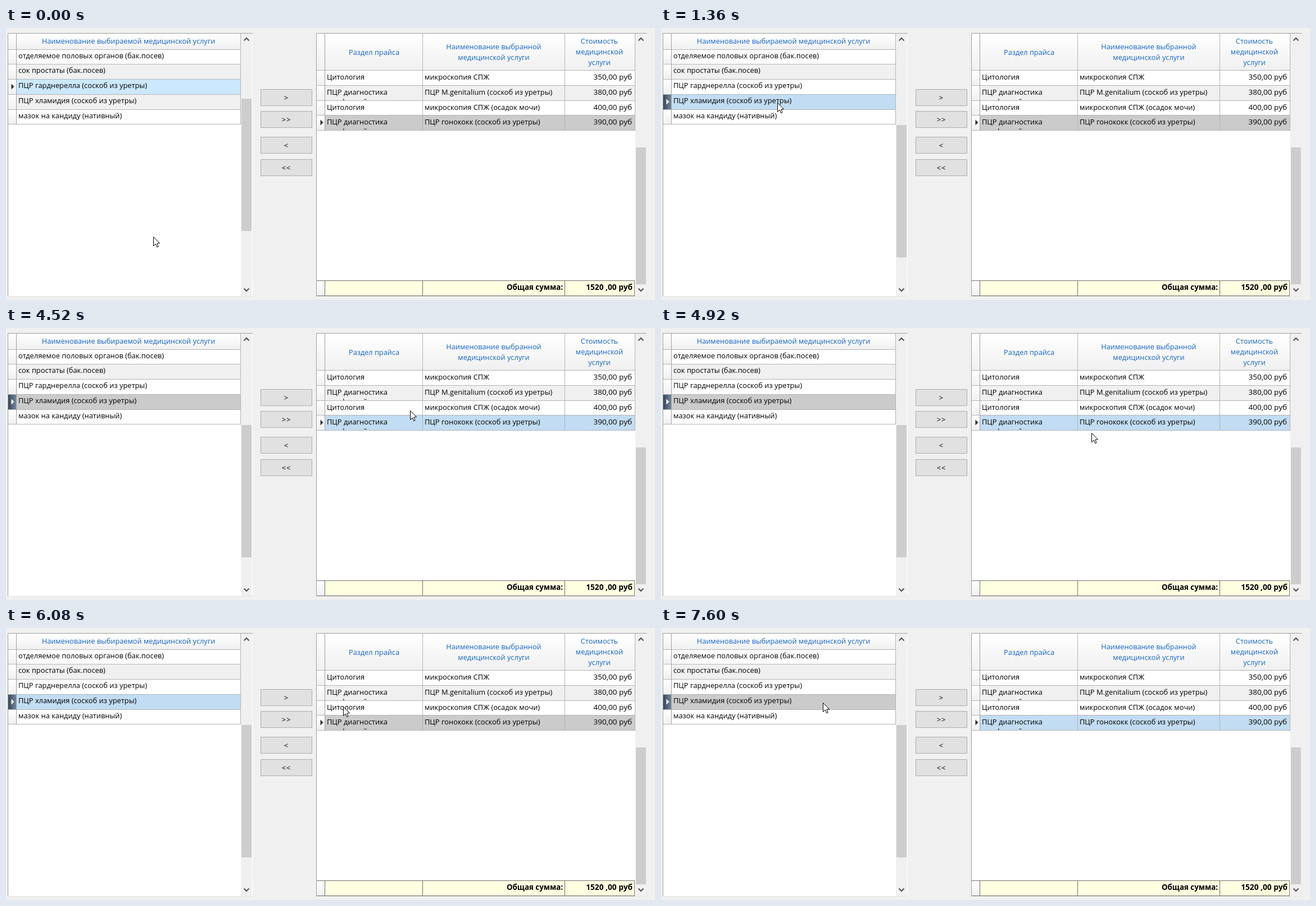
Write an HTML page with a canvas that moves like this. It is 1155 px wide and 485 px high and loops after 8000 ms.

```html
<!DOCTYPE html>
<html lang="ru">
<head>
<meta charset="utf-8">
<style>
html, body { margin: 0; width: 100%; height: 100%; overflow: hidden; background: #f0f0f0; }
canvas { display: block; }
</style>
</head>
<body>
<canvas id="stage" width="1155" height="485"></canvas>
<script>
const ctx = document.getElementById('stage').getContext('2d');
const LOOP = 8000;
const GRID = '#b4b4b4', EDGE = '#a0a0a0', BLUE = '#1565c8';
const HOT = '#cce8ff', ACTIVE = '#c2dcf3', IDLE = '#cbcbcb';

const services = [
  'отделяемое половых органов (бак.посев)',
  'сок простаты (бак.посев)',
  'ПЦР гарднерелла (соскоб из уретры)',
  'ПЦР хламидия (соскоб из уретры)',
  'мазок на кандиду (нативный)'
];
const chosen = [
  ['Цитология', 'микроскопия СПЖ', '350,00 руб'],
  ['ПЦР диагностика', 'ПЦР M.genitalium (соскоб из уретры)', '380,00 руб'],
  ['Цитология', 'микроскопия СПЖ (осадок мочи)', '400,00 руб'],
  ['ПЦР диагностика', 'ПЦР гонококк (соскоб из уретры)', '390,00 руб']
];
const leftLines = [38, 64, 91, 118, 145, 171];
const rightLines = [75, 102, 129, 155, 182];

// Pointer tip: time, x, y
const path = [
  [0, 262, 372], [240, 262, 372], [360, 248, 310], [520, 219, 165], [640, 210, 118],
  [800, 210, 118], [840, 208, 130], [920, 207, 139], [1040, 207, 139], [1080, 207, 133],
  [4040, 207, 133], [4080, 204, 130], [4200, 285, 108], [4320, 470, 100], [4440, 645, 120],
  [4520, 719, 147], [4640, 755, 182], [4760, 765, 193], [4840, 765, 190], [4920, 766, 187],
  [5880, 766, 187], [6000, 700, 160], [6160, 500, 120], [6280, 375, 113],
  [6400, 305, 123], [6520, 288, 133], [LOOP, 288, 133]
];

function box(x, y, w, h, fill) {
  ctx.fillStyle = fill;
  ctx.fillRect(x, y, w, h);
}

function text(s, x, y, { align = 'left', color = '#000', size = 12.85, weight = 400 } = {}) {
  ctx.font = `${weight} ${size}px "Open Sans", "Noto Sans", sans-serif`;
  ctx.textAlign = align;
  ctx.fillStyle = color;
  ctx.fillText(s, x, y);
}

const title = (s, x, y) => text(s, x, y, { align: 'center', color: BLUE, size: 12.75 });

function shape(points, fill, stroke) {
  ctx.beginPath();
  points.forEach(([x, y]) => ctx.lineTo(x, y));
  ctx.closePath();
  ctx.fillStyle = fill;
  ctx.fill();
  if (stroke) {
    ctx.strokeStyle = stroke;
    ctx.lineWidth = 1;
    ctx.stroke();
  }
}

function header(x, y, w, h) {
  const g = ctx.createLinearGradient(0, y, 0, y + h);
  g.addColorStop(0, '#fff');
  g.addColorStop(1, '#f0f0f0');
  box(x, y, w, h, g);
}

function panel(x, w) {
  box(x, 9, w, 470, '#fff');
  box(x, 9, w, 1, EDGE);
  box(x, 9, 1, 470, EDGE);
  box(x, 478, w, 1, '#e3e3e3');
}

function chevron(x, y, dir) {
  ctx.beginPath();
  ctx.moveTo(x - 4.5, y + 2.5 * dir);
  ctx.lineTo(x, y - 2 * dir);
  ctx.lineTo(x + 4.5, y + 2.5 * dir);
  ctx.strokeStyle = '#505050';
  ctx.lineWidth = 2;
  ctx.stroke();
}

function scrollbar(x, top, bottom) {
  box(x, 10, 20, 468, '#f0f0f0');
  box(x + 1, top, 18, bottom - top, '#cdcdcd');
  chevron(x + 10, 20, 1);
  chevron(x + 10, 467, -1);
}

function marker(x, y, fill) {
  shape([[x, y - 5], [x + 5, y], [x, y + 5]], fill);
}

function indicator(x, top, bottom, dark) {
  header(x, top, 14, bottom - top);
  if (!dark) return;
  const g = ctx.createLinearGradient(x, 0, x + 14, 0);
  g.addColorStop(0, '#35475c');
  g.addColorStop(1, '#74869a');
  box(x, top, 14, bottom - top, g);
}

function rowFill(i, selected, color) {
  return i === selected ? color : i % 2 ? '#f0f0f0' : '#fff';
}

function drawLeft(selected, color, dark, thumb) {
  panel(3, 436);
  header(4, 10, 414, 28);
  title(services.title, 218, 28);
  services.forEach((name, i) => {
    const top = leftLines[i] + 1, bottom = leftLines[i + 1];
    box(19, top, 398, bottom - top, rowFill(i, selected, color));
    indicator(4, top, bottom, dark && i === selected);
    if (i === selected) marker(9.5, top + 12.5, dark ? '#fff' : '#303030');
    text(name, 22, top + 15);
  });
  leftLines.forEach(y => box(4, y, 414, 1, GRID));
  box(18, 10, 1, 162, EDGE);
  box(417, 10, 1, 162, GRID);
  scrollbar(418, thumb, thumb + 236);
}

function drawRight(color) {
  panel(552, 588);
  header(553, 10, 566, 65);
  title('Раздел прайса', 655, 48);
  title('Наименование выбранной', 868, 38);
  title('медицинской услуги', 868, 57);
  ['Стоимость', 'медицинской', 'услуги'].forEach((s, i) => title(s, 1056, 28 + 19 * i));
  chosen.forEach(([section, name, price], i) => {
    const top = rightLines[i] + 1, bottom = rightLines[i + 1];
    box(568, top, 551, bottom - top, rowFill(i, 3, color));
    indicator(553, top, bottom);
    ctx.save();
    ctx.beginPath();
    ctx.rect(568, top, 551, bottom - top);
    ctx.clip();
    text(section, 571, top + 16);
    if (i % 2) text('инфекций', 580, top + 33);
    text(name, 745, top + 16);
    text(price, 1114, top + 16, { align: 'right', size: 13.5 });
    ctx.restore();
  });
  marker(559.5, 168.5, '#303030');
  rightLines.forEach(y => box(553, y, 567, 1, GRID));
  [567, 741, 994, 1119].forEach(x => box(x, 10, 1, 173, x === 567 ? EDGE : GRID));

  box(568, 450, 551, 28, '#ffffe1');
  header(553, 450, 14, 28);
  box(553, 450, 566, 1, '#707070');
  box(553, 477, 566, 1, '#707070');
  [567, 741, 994, 1118].forEach(x => box(x, 450, 1, 28, '#707070'));
  text('Общая сумма:', 991, 467, { align: 'right', size: 13.3, weight: 700 });
  text('1520 ,00 руб', 1115, 467, { align: 'right', size: 13.7, weight: 700 });
  scrollbar(1120, 213, 457);
}

function button(label, y) {
  box(453, y, 92, 30, '#adadad');
  box(454, y + 1, 90, 28, '#e1e1e1');
  ctx.letterSpacing = '1px';
  text(label, 499, y + 20, { align: 'center' });
  ctx.letterSpacing = '0px';
}

function pointerAt(t) {
  const i = path.findIndex(p => p[0] > t);
  const [t0, x0, y0] = path[i - 1], [t1, x1, y1] = path[i];
  const k = (t - t0) / (t1 - t0);
  return [Math.round(x0 + (x1 - x0) * k), Math.round(y0 + (y1 - y0) * k)];
}

function drawPointer([x, y]) {
  const outline = [[0, 0], [0, 16], [3.7, 12.5], [6.2, 18.2], [8.6, 17.2], [6.2, 11.6], [11, 11.3]];
  shape(outline.map(([dx, dy]) => [x + dx + 0.5, y + dy + 0.5]), '#fff', '#000');
}

services.title = 'Наименование выбираемой медицинской услуги';

function draw(now) {
  const t = Math.floor(now % LOOP / 40) * 40;
  const moved = t >= 1280, pressed = t >= 1360;
  const rightFocus = (t >= 3720 && t < 5640) || t >= 7600;
  box(0, 0, 1155, 485, '#f0f0f0');
  drawLeft(moved ? 3 : 2, rightFocus ? IDLE : pressed ? ACTIVE : HOT, pressed, moved ? 173 : 126);
  drawRight(rightFocus ? ACTIVE : IDLE);
  button('>', 109);
  button('>>', 148);
  button('<', 194);
  button('<<', 234);
  drawPointer(pointerAt(t));
}

const start = performance.now();
function tick() {
  draw(performance.now() - start);
  requestAnimationFrame(tick);
}
tick();
</script>
</body>
</html>
```
